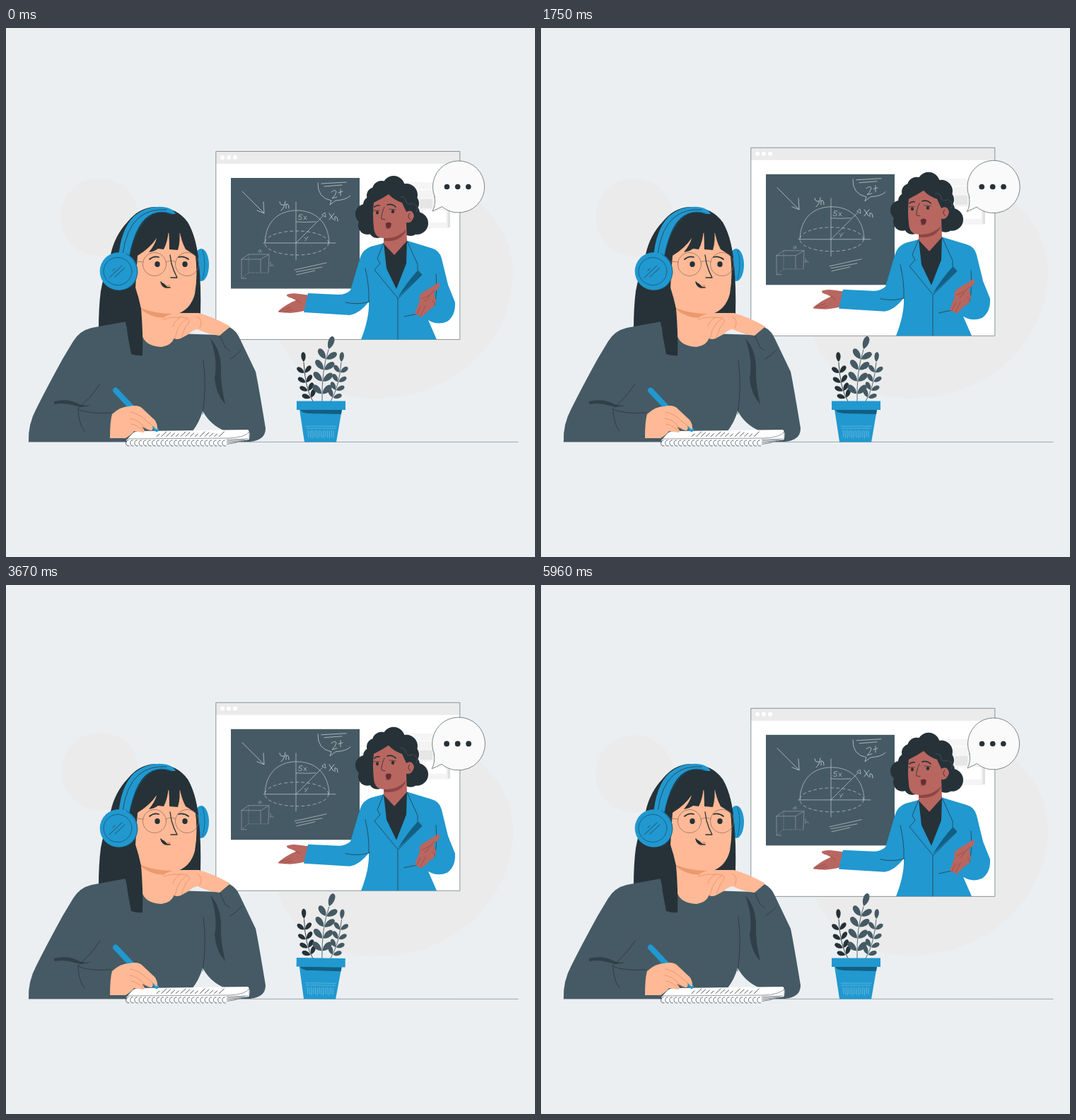
Recreate the animation shown at these times as an HTML page with a canvas. Size 748 px wide and 748 px high, loop 6000 ms.

```html
<!DOCTYPE html>
<html lang="en">
<head>
<meta charset="utf-8">
<title>Online lesson</title>
<style>
  html, body { margin: 0; width: 100%; height: 100%; overflow: hidden; background: #ebeff2; }
  canvas { display: block; width: 100vw; height: 100vh; }
</style>
</head>
<body>
<canvas id="stage"></canvas>
<script>
const SIZE = 748, LOOP = 6000;
const BG = '#ebeff2', DARK = '#263238', SLATE = '#455a64', FOLD = '#303f48', BLUE = '#2198cf',
  DEEP = '#125f83', SKIN = '#ffb996', BLUSH = '#eb996e', BROWN = '#b86660', UMBER = '#8e4644', PALE = '#ebebeb';

const canvas = document.getElementById('stage');
const ratio = window.devicePixelRatio || 1;
canvas.width = canvas.height = SIZE * ratio;
const ctx = canvas.getContext('2d');
ctx.lineCap = ctx.lineJoin = 'round';

const cache = new Map();
function path(d) {
  if (!cache.has(d)) cache.set(d, new Path2D(d));
  return cache.get(d);
}
function fill(color, d) {
  ctx.fillStyle = color;
  ctx.fill(path(d));
}
function line(color, width, d) {
  ctx.strokeStyle = color;
  ctx.lineWidth = width;
  ctx.stroke(path(d));
}
function rect(color, x, y, w, h) {
  ctx.fillStyle = color;
  ctx.fillRect(x, y, w, h);
}
function oval(color, x, y, rx, ry = rx, turn = 0) {
  ctx.beginPath();
  ctx.ellipse(x, y, rx, ry, turn, 0, 2 * Math.PI);
  ctx.fillStyle = color;
  ctx.fill();
}
function ring(color, width, x, y, rx, ry = rx) {
  ctx.beginPath();
  ctx.ellipse(x, y, rx, ry, 0, 0, 2 * Math.PI);
  ctx.strokeStyle = color;
  ctx.lineWidth = width;
  ctx.stroke();
}
function group(x, y, angle, scale, draw) {
  ctx.save();
  ctx.translate(x, y);
  ctx.rotate(angle);
  ctx.scale(scale, scale);
  ctx.translate(-x, -y);
  draw();
  ctx.restore();
}

// Linear interpolation through [time, value] keys
function track(keys, t) {
  let i = 1;
  while (i < keys.length - 1 && t > keys[i][0]) i++;
  const [t0, a] = keys[i - 1], [t1, b] = keys[i];
  return a + (b - a) * Math.min(1, (t - t0) / (t1 - t0));
}
const lift = [[0, 0], [3250, 9.7], [LOOP, 0]];
const pulse = [[0, 0], [700, 1], [1950, 0], [2400, 0], [3300, 1], [3780, 0], [LOOP, 0]];
const sway = [[0, 0], [750, .85], [1750, -.1], [2300, -.5], [3130, -.1], [3750, .85],
  [4210, .6], [5100, -.85], [LOOP, 0]];

function backdrop() {
  oval(PALE, 132, 267, 55);
  fill(PALE, 'M717 345 C717 300 690 256 640 225 L420 290 Q372 350 376 405 C384 450 420 524 523 524 C630 524 717 445 717 345Z');
}

function chalkboard() {
  rect(SLATE, 318, 212, 182, 156.5);
  const c = '#c3ccd1';
  line(c, .8, 'M334 231 L365 262 M355 258 L365 262 L364 246');
  line(c, .7, 'M364 304 L466 304 M410 246 L410 328 M410 304 L448 266 M366 304 C367 273 386 258 411 258 C437 258 456 274 457 304');
  line(c, .7, 'M447 264 L451 261 L452 267Z M410 274 Q425 275 438 274');
  ctx.setLineDash([4, 4]);
  ring(c, .7, 411, 304, 45, 17);
  ctx.setLineDash([]);
  // handwriting
  line(c, .9, 'M387 246 Q388 252 393 250 M395 245 Q394 254 389 258 M396 255 L396 249 Q400 248 400 255');
  line(c, .9, 'M457 262 L463 271 M464 262 L457 271 M465 272 L465 267 Q469 266 469 273');
  line(c, .7, 'M419 264 L415 264 L414 267 Q419 266 418 270 Q416 272 413 270 M421 266 L425 271 M425 266 L421 271');
  line(c, .7, 'M422 296 L424 298 M427 295 L423 301');
  line(c, .8, 'M441 219 Q440 240 460 244 L458 250 L466 244 Q482 243 487 237');
  line(c, .8, 'M446 220 L481 218 M450 224 L475 222 M460 232 Q466 227 467 232 Q465 238 461 241 L468 239 M470 233 L476 231 M473 228 L473 237');
  line(c, .7, 'M408 342 L453 332 M410 345 L447 338 M411 349 L437 343');
  const faint = '#93a2a9';
  line(faint, .7, 'M333 327 L360 327 L360 345 M333 327 L333 354 L340 354 M333 327 L343 320 L372 320 L360 327 M372 320 L371 345');
  ctx.setLineDash([2, 2]);
  line(faint, .5, 'M343 320 L343 346 L371 346 M343 346 L333 354');
  ctx.setLineDash([]);
  line(faint, .7, 'M360 314 Q356 314 357 317 Q360 318 360 314 L361 317 M374 331 L374 337 Q377 332 378 337');
}

function teacher() {
  const curls = [[548, 225, 16], [531, 229, 13], [566, 236, 16], [522, 237, 12], [517, 250, 12], [508, 263, 14],
    [511, 279, 13], [525, 285, 12], [571, 248, 13], [571, 262, 14], [581, 276, 16], [572, 282, 12], [545, 255, 25]];
  for (const [x, y, r] of curls) oval(DARK, x, y, r);
  // hands and jacket
  fill(BROWN, 'M430 378 L415 376 Q404 374 397 377 Q396 380 404 382 L410 385 Q398 390 389 397 Q382 402 387 402 L402 403 Q416 402 428 398Z');
  line(UMBER, .7, 'M388 400 L402 395 M393 402 L405 398 M410 385 Q415 386 416 389');
  fill(BLUE, 'M535 304 L516 309 Q505 313 501 324 L487 371 Q480 377 470 377 L427 375 L421 402 L486 406 Q500 404 513 387 Q514 410 502 440.5 L609 440.5 L597 413 Q610 421 624 415 Q636 406 635 388 L625 363 L616 326 Q613 314 601 311 L568 301Z');
  fill(DARK, 'M534 304 L538 340 L552 369 L566 333 L567 299 L549 319Z');
  fill(BROWN, 'M520 247 Q532 241 541 235 Q548 243 560 247 L566 260 Q575 255 577 266 Q574 277 566 275 L567 301 L549 321 L534 305 L534 297 Q521 297 520 282 Q518 263 520 247Z');
  fill(UMBER, 'M534 297 Q552 299 566 285 Q559 303 535 301Z');
  line(DARK, .7, 'M534 304 L525 326 L529 333 L521 342 L554 382 L554 440 M567 301 L582 334 L582 342 L588 349 L555 382');
  fill(DEEP, 'M554 381 Q567 359 582 343 L588 349Z');
  line(DARK, .7, 'M513 387 Q514 365 508 340 M514 387 Q497 392 480 388 M608 348 Q610 375 606 392 M563 408 L592 402');
  fill(BROWN, 'M578 404 L585 385 Q583 377 589 374 L610 361 Q614 360 613 366 L605 375 L608 385 Q608 394 598 399 L588 409Z');
  line(UMBER, .7, 'M588 383 L600 377 L606 371 M592 386 Q597 384 598 379 M586 394 L581 405 M593 393 L586 407 M603 386 Q607 387 606 391');
  // face
  line(DARK, 1.7, 'M521 253 Q524 250 528 251 M539 250 Q546 248 551 253');
  oval(DARK, 525, 261, 2, 2.6);
  oval(DARK, 547, 259.5, 2.2, 2.6);
  line(DARK, .7, 'M520 258 L528 258 M542 256 L551 257');
  line(DARK, .8, 'M535 253 Q530 265 531 270 L536 271 M571 262 Q566 267 572 271');
  fill('#642f34', 'M537 276 Q543 273 545 277 Q544 284 540 284 Q536 281 537 276Z');
  line('#8d4748', 1, 'M537 283 Q541 285 544 282');
  line('#53636b', .6, 'M558 239 Q564 237 566 246 Q568 251 575 248 M577 249 Q585 252 580 260');
}

function browser() {
  rect('#ffffff', 297, 174.5, 345, 266);
  rect(PALE, 297, 174.5, 345, 17.5);
  for (const x of [306, 315, 324]) oval('#ffffff', x, 183, 3);
  ctx.strokeStyle = '#5f6a70';
  ctx.lineWidth = .7;
  ctx.strokeRect(297.2, 174.5, 344.6, 266);
  rect('#f5f5f5', 566, 218, 38, 10);
  rect('#f4f4f4', 583, 229, 44, 54);
  rect('#e6e6e6', 585, 242, 18, 13);
  rect('#ffffff', 590, 258, 32, 17);
  rect('#e0e0e0', 624.5, 258, 3.5, 24);
  chalkboard();
  teacher();
}

function bubble() {
  const rad = Math.PI / 180;
  ctx.beginPath();
  ctx.arc(640, 224.5, 36.6, 157 * rad, 490 * rad);
  ctx.quadraticCurveTo(610, 256, 603, 259);
  ctx.quadraticCurveTo(608, 250, 606, 239);
  ctx.closePath();
  ctx.fillStyle = '#fafafa';
  ctx.fill();
  ctx.strokeStyle = '#4b575d';
  ctx.lineWidth = .7;
  ctx.stroke();
  for (const x of [623.5, 638.7, 653.8]) oval(DARK, x, 224.5, 3.8);
}

// A bending stem with leaf pairs and one leaf at the tip
function stem(color, x0, y0, cx, cy, x1, y1, pairs, len, wide) {
  ctx.beginPath();
  ctx.moveTo(x0, y0);
  ctx.quadraticCurveTo(cx, cy, x1, y1);
  ctx.strokeStyle = color;
  ctx.lineWidth = .9;
  ctx.stroke();
  const leaf = (x, y, a, l) => {
    ctx.save();
    ctx.translate(x, y);
    ctx.rotate(a);
    ctx.beginPath();
    ctx.moveTo(1, 0);
    ctx.bezierCurveTo(l * .4, -wide * .8, l, -wide * .6, l, 0);
    ctx.bezierCurveTo(l, wide * .6, l * .4, wide * .8, 1, 0);
    ctx.fillStyle = color;
    ctx.fill();
    ctx.restore();
  };
  for (let i = 0; i <= pairs; i++) {
    const u = .12 + .88 * i / pairs, v = 1 - u;
    const x = v * v * x0 + 2 * u * v * cx + u * u * x1;
    const y = v * v * y0 + 2 * u * v * cy + u * u * y1;
    const a = Math.atan2(v * (cy - y0) + u * (y1 - cy), v * (cx - x0) + u * (x1 - cx));
    if (i === pairs) leaf(x, y, a, len * 1.1);
    else for (const side of [-1, 1]) leaf(x, y, a + side * .8, len);
  }
}

function plant() {
  stem(DARK, 434, 528, 423, 510, 421, 473, 4, 13.5, 6);
  stem(SLATE, 459, 528, 471, 508, 474, 473, 4, 13.5, 6);
  stem(SLATE, 447, 528, 446, 485, 456, 455, 4, 18, 8);
  fill(BLUE, 'M415 539 L475 539 L467 585.5 L422 585.5Z');
  fill(DEEP, 'M416 540 L475 540 L474 546 L428 545 Q418 544 416 540Z');
  rect(BLUE, 411, 527.5, 69, 12.5);
  const c = '#6fc0e4';
  line(c, .7, 'M424 563 L467 563 M425 566 L466 566');
  for (let i = 0; i < 14; i++) {
    const x = 427 + i * 2.8;
    line(c, .8, `M${x} ${569 + i % 2} L${x + (7 - i) * .1} ${578 + i % 3}`);
  }
}

function notebook() {
  fill('#ffffff', 'M170 583 L179 573 Q182 570 190 570 L342 568 Q346 570 344 582 Q329 584 312 590 L174 590Z');
  line(DARK, .5, 'M172 581 L315 580 Q339 579 344 571 M344 570 L344 583');
  for (let x = 172; x < 312; x += 6.2)
    line(DARK, .7, `M${x + 1} 583 C${x - 4} 582 ${x - 4} 592 ${x + 2} 591`);
  for (let i = 0; i < 5; i++)
    line(DARK, .5, `M${312 + i % 2} ${582 + i * 1.7} L${342 - i * 4} ${581 + i * 1.3}`);
  for (let i = 0; i < 14; i++) {
    const x = 213 + i * 6.8, h = 3 + (i * 7 % 4);
    line(DARK, .8, `M${x} 577.5 L${x + h + 1} ${577 - h}`);
  }
}

function torso() {
  fill(SLATE, 'M32 585 Q31 560 43 538 Q58 508 80 468 L95 443 Q104 428 121 424 L170 415 L195 412 L240 432 L302 434 L316 423 Q326 428 331 440 L353 486 Q357 505 367 566 Q367 583 345 585Z');
  fill(BG, 'M278 541 Q274 557 263 571 L310 570 Q288 561 278 541Z');
  fill(FOLD, 'M68 528 Q87 523 104 532 Q110 535 120 533 Q109 538 97 534 Q83 529 68 532Z');
  fill(FOLD, 'M289 439 Q300 470 295 495 Q297 518 310 532 Q303 503 304 482 Q304 455 289 439Z');
  line(DARK, .7, 'M133 503 Q119 524 101 539 Q117 546 149 544 M102 541 Q103 560 111 570');
  line(DARK, .7, 'M279 470 Q284 505 278 546 M317 468 Q326 463 333 455 M302 434 L310 452 L316 456');
}

function head() {
  fill(SKIN, 'M181 318 L183 367 Q188 382 191 397 L192 433 Q196 450 220 451 Q234 449 238 438 L240 405 Q261 399 267 376 Q272 346 267 316 L258 290 L200 290Z');
  fill(BLUSH, 'M191 396 Q211 404 235 404 L232 409 Q210 413 191 398Z');
  fill(DARK, 'M172 345 Q170 270 205 256 Q240 251 257 275 Q268 293 272 325 Q261 317 254 313 Q248 302 245 285 Q247 300 243 314 L231 313 Q231 300 230 284 Q229 302 223 313 L215 312 Q210 316 202 317 Q211 306 213 297 Q204 311 186 322 Q184 346 183 369Z');
  fill(DARK, 'M160 395 Q171 414 172 434 L177 461 Q186 464 193 463 Q194 430 191 398 L182 368Z');
  // glasses and features
  const rim = '#876a58';
  ring(rim, .7, 210, 334, 16.5);
  ring(rim, .7, 256, 334, 16.5);
  line(rim, .7, 'M226 331 Q234 327 240 331 M194 331 L184 330');
  oval(DARK, 214, 334, 3.7, 4);
  oval(DARK, 253, 334, 3.7, 4);
  line(DARK, 1.8, 'M203 327 Q209 322 216 324 M244 324 Q251 322 258 327');
  line(DARK, 1.3, 'M232 321 L234 333 Q237 344 242 353 L233 353');
  fill(BLUSH, 'M222 367 Q229 371 233 364 Q230 361 222 367Z');
  line(DARK, 1.5, 'M219 359 Q221 368 232 367');
  fill(DARK, 'M219 359 Q224 361 228 366 Q220 368 219 359Z');
}

function headphones() {
  fill(BLUE, 'M159 325 Q162 285 181 266 Q199 251 222 253 Q235 254 240 263 L233 263 Q221 258 209 262 Q183 271 174 325Z');
  line(DARK, .7, 'M165 320 Q170 283 188 268 Q204 255 227 257');
  line(DEEP, .8, 'M174 325 Q181 281 207 263 Q221 257 235 263');
  oval(BLUE, 159.5, 344, 26.8, 26.8);
  line(DEEP, .9, 'M170 319 Q186 329 186 346 Q184 364 170 369');
  ring(DEEP, .9, 158, 344, 20, 19.6);
  line(DARK, .7, 'M146 353 L164 336 M154 352 L168 339 M151 343 L154 340');
}

function hands() {
  fill(SKIN, 'M222 411 Q229 403 247 403 L273 403 Q294 409 317 422 L302 435 Q285 433 271 426 Q264 427 258 433 L247 439 Q238 442 236 436 L237 420 Q229 418 222 411Z');
  line(BLUSH, 1, 'M222 412 Q234 408 247 409 Q238 414 236 422 M247 409 L257 410 Q247 416 242 428 L239 439 M257 411 Q263 414 254 422 L248 437 M270 408 Q280 413 274 424');
  line(BLUE, 8, 'M155 512.5 L179 538');
  line(BLUE, 6, 'M203 558 L213 568');
  fill(SKIN, 'M147 580 Q147 556 150 546 Q162 535 174 535 Q188 532 194 539 L211 555 Q216 565 213 568 L207 562 Q209 570 204 569 L192 564 Q199 571 194 572 L181 570 Q175 577 169 580Z');
  line(BLUSH, 1, 'M176 543 Q188 545 198 555 L208 563 M175 552 Q186 553 195 564 L201 568 M177 560 Q185 561 193 569');
}

function girl() {
  oval(BLUE, 276, 335, 11, 23);
  line(DEEP, .8, 'M278 314 Q284 334 278 355');
  fill(DARK, 'M172 274 Q154 293 148 320 Q138 350 134 372 Q131 395 131 426 L196 426 L275 405 Q276 365 273 335 Q269 297 257 275 Q242 253 210 253 Q188 254 172 274Z');
  torso();
  head();
  headphones();
  notebook();
  hands();
}

function draw(t) {
  const tilt = track(sway, t) * Math.PI / 180;
  ctx.setTransform(ratio, 0, 0, ratio, 0, 0);
  rect(BG, 0, 0, SIZE, SIZE);
  group(397, 368, tilt, 1, backdrop);
  ctx.save();
  ctx.translate(0, -track(lift, t));
  browser();
  ctx.restore();
  group(640, 224.3, 0, 1 + .103 * track(pulse, t), bubble);
  line('#7c868b', .7, 'M32 585.4 L724 585.4');
  group(445, 512, tilt, 1, plant);
  girl();
}

const start = performance.now();
function tick() {
  draw((performance.now() - start) % LOOP);
  requestAnimationFrame(tick);
}
tick();
</script>
</body>
</html>
```
